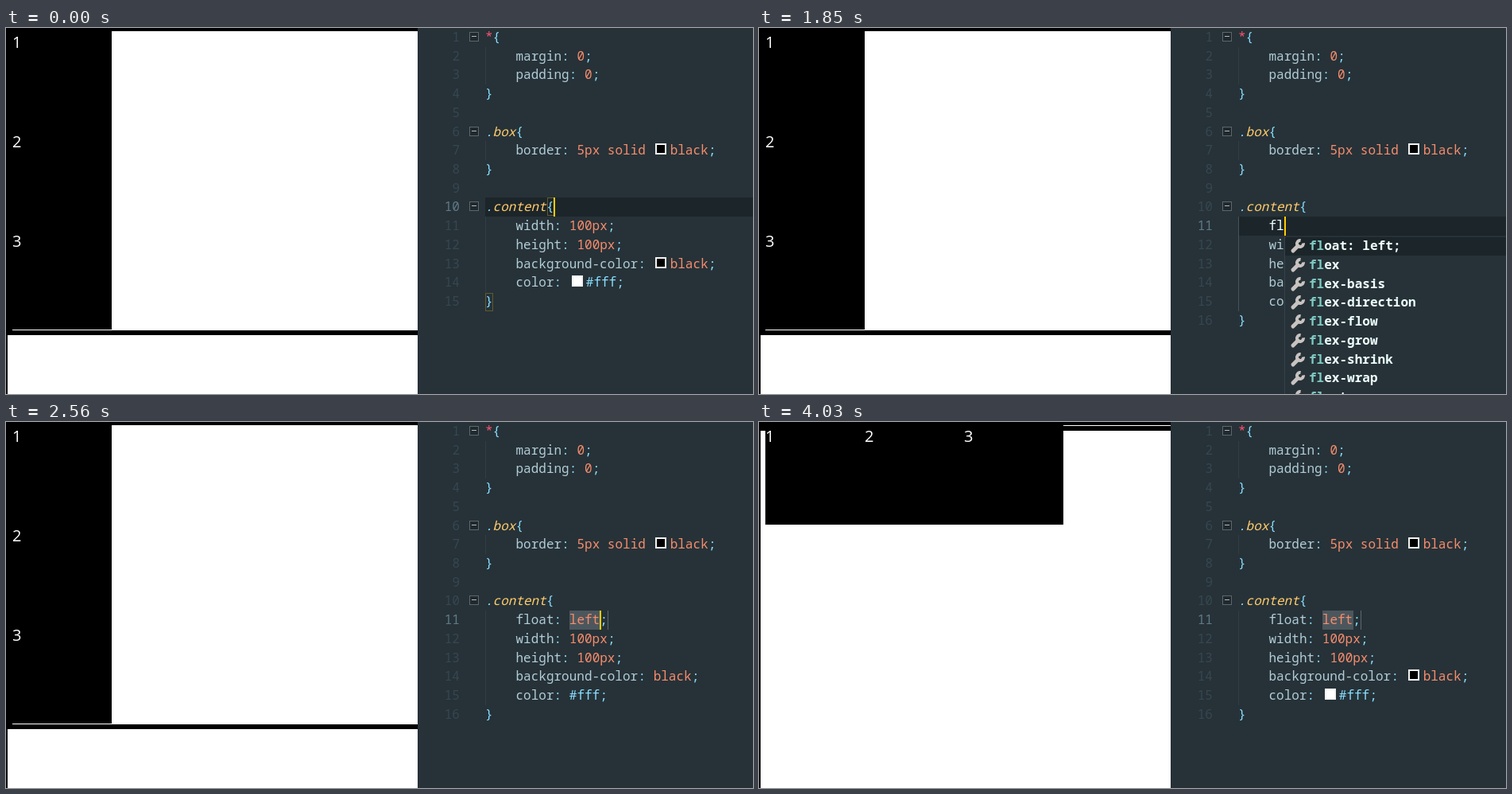
Animation, 940 px wide and 460 px high, one loop 4.5 s. Source, as an HTML page with a canvas:

```html
<!DOCTYPE html>
<html lang="en">
<head>
<meta charset="utf-8">
<title>Floating boxes</title>
<style>
html, body { margin: 0; width: 100%; height: 100%; overflow: hidden; background: #263238; }
canvas { display: block; }
</style>
</head>
<body>
<canvas id="stage" width="940" height="460"></canvas>
<script>
const g = document.getElementById('stage').getContext('2d');
const LOOP = 4500, PITCH = 23.72, ADV = 9.62, LEFT = 603;
const MONO = '16px "Noto Sans Mono", "DejaVu Sans Mono", monospace';
const C = {
  bg: '#263238', dark: '#1c2529', dim: '#37474f', active: '#607a86', guide: '#313e44',
  punct: '#89ddff', prop: '#b2ccd6', value: '#f78c6c', name: '#ffcb6b', star: '#ff5370',
  plain: '#eeffff', match: '#80cbc4', caret: '#ffcc00'
};

const POPUPS = {
  f: ['float: left;', 'font', 'font-family', 'font-feature-settings', 'font-kerning',
    'font-size', 'font-size-adjust', 'font-stretch', 'font-style'],
  fl: ['float: left;', 'flex', 'flex-basis', 'flex-direction', 'flex-flow',
    'flex-grow', 'flex-shrink', 'flex-wrap', 'float'],
  flo: ['float: left;', 'float', 'flood-color', 'flood-opacity', 'flex-flow',
    'fill-opacity', 'flex-direction', '-webkit-flex-direction', '-ms-flex-flow'],
  flol: ['float: left;', 'flood-color', 'flex-flow', 'fill-opacity', '-ms-flex-flow',
    '-webkit-text-fill-color', 'animation-fill-mode', '-o-animation-fill-mode',
    '-webkit-animation-fill-mode']
};

const lineTop = n => Math.round(PITCH * (n - 1));
const lineHeight = n => lineTop(n + 1) - lineTop(n);
const col = n => LEFT + n * ADV;
const caretX = n => Math.floor(col(n) + 0.3);

function rect(color, x, y, w, h) {
  g.fillStyle = color;
  g.fillRect(x, y, w, h);
}

function outline(color, x, y, w, h) {
  g.strokeStyle = color;
  g.lineWidth = 1;
  g.strokeRect(x + 0.5, y + 0.5, w - 1, h - 1);
}

function text(s, x, y, color, style = 'normal') {
  g.font = style + ' ' + MONO;
  g.fillStyle = color;
  g.fillText(s, x, y);
}

const code = (s, c, n, color, style) => text(s, col(c), lineTop(n) + 17, color, style);

function fold(n) {
  const y = lineTop(n) + 5;
  rect('#20292e', 583, y, 12, 12);
  outline('#5c676c', 583, y, 12, 12);
  rect('#b4babd', 586, y + 5, 6, 1);
}

function selector(n, name) {
  if (name === '*') code('*', 0, n, C.star);
  else {
    code('.', 0, n, C.punct, 'italic');
    code(name.slice(1), 1, n, C.name, 'italic');
  }
  code('{', name.length, n, C.punct);
}

// A colour chip, when given, sits between lead and value.
function declare(n, prop, value, chip, lead = '') {
  let c = 4 + prop.length + 2;
  code(prop, 4, n, C.prop);
  code(':', c - 2, n, C.punct);
  code(lead, c, n, C.value);
  c += lead.length;
  if (chip) {
    const x = Math.round(col(c) + 2.8), y = lineTop(n) + 3;
    rect('#f2f2f2', x, y, 14, 14);
    rect(chip, x + 2, y + 2, 10, 10);
    c += 21 / ADV;
  }
  code(value, c, n, value[0] === '#' ? C.punct : C.value);
  code(';', c + value.length, n, C.punct);
}

function guide(from, to, color = C.guide) {
  rect(color, 603, lineTop(from), 1, lineTop(to + 1) - lineTop(from));
}

// Indexes of the letters of key within s, or null.
function matches(s, key) {
  const hits = [];
  let at = -1;
  for (const ch of key) {
    at = s.indexOf(ch, at + 1);
    if (at < 0) return null;
    hits.push(at);
  }
  return hits;
}

function wrench(x, y) {
  g.strokeStyle = '#c8c3c0';
  g.lineCap = 'round';
  g.lineWidth = 5;
  g.beginPath();
  g.moveTo(x + 3, y + 15);
  g.lineTo(x + 9, y + 9);
  g.stroke();
  g.lineCap = 'butt';
  g.lineWidth = 4;
  g.beginPath();
  g.arc(x + 12, y + 6, 4, -0.15, Math.PI * 1.5 + 0.15);
  g.stroke();
}

function drawPopup(key) {
  const x = caretX(4 + key.length), y = lineTop(12);
  rect(C.bg, x, y, 940 - x, 460 - y);
  rect('#364249', x, y, 1, 460 - y);
  rect(C.dark, x + 1, y + 2, 939 - x, 23);
  POPUPS[key].forEach((item, i) => {
    const base = Math.round(279 + 23.75 * i);
    const hits = matches(item, key) || matches(item, 'fllo') || [];
    wrench(x + 8, base - 14);
    [...item].forEach((ch, j) =>
      text(ch, x + 31 + j * ADV, base, hits.includes(j) ? C.match : C.plain, 'bold'));
  });
}

function preview(floated) {
  rect('#000', 0, 0, 518, 460);
  if (floated) {
    rect('#fff', 2, 11, 516, 449);
    rect('#fff', 383, 4, 135, 1);
    rect('#000', 8, 0, 375, 129);
  } else {
    rect('#fff', 133, 4, 385, 375);
    rect('#fff', 8, 379, 510, 1);
    rect('#fff', 2, 386, 516, 74);
  }
  g.font = '20px "Open Sans", "Noto Sans", sans-serif';
  g.fillStyle = '#fff';
  for (let i = 0; i < 3; i++)
    g.fillText(i + 1, 8 + (floated ? 125 * i : 0), 25 + (floated ? 0 : 125 * i));
}

function draw(t) {
  const opened = t >= 1140, done = t >= 2560;
  const shift = opened ? 1 : 0, current = 10 + shift, last = 15 + shift;
  const typed = t < 1620 || done ? ''
    : t < 1850 ? 'f' : t < 2090 ? 'fl' : t < 2320 ? 'flo' : 'flol';
  const list = t < 1680 ? '' : t >= 2320 && t < 2390 ? 'flo' : typed;
  const caretOn = !(t >= 440 && t < 900 || t >= 3090 && t < 3570 || t >= 4030);

  preview(t >= 3630);
  rect(C.bg, 518, 0, 422, 460);
  if (!done) rect(C.dark, LEFT, lineTop(current), 940 - LEFT, lineHeight(current));
  guide(2, 3);
  guide(7, 7);
  guide(11, last - 1, opened && !done ? '#46545b' : C.guide);

  for (let n = 1; n <= last; n++)
    text(n, 571 - String(n).length * ADV, lineTop(n) + 17, n === current ? C.active : C.dim);
  [1, 6, t >= 1140 && t < 1370 ? 11 : 10].forEach(fold);

  selector(1, '*');
  declare(2, 'margin', '0');
  declare(3, 'padding', '0');
  code('}', 0, 4, C.punct);
  selector(6, '.box');
  declare(7, 'border', 'black', '#000', '5px solid ');
  code('}', 0, 8, C.punct);
  selector(10, '.content');

  if (done) {
    rect('#4c575d', 709, lineTop(11), 39, lineHeight(11));
    declare(11, 'float', 'left');
    rect('#5d686d', 757, lineTop(11), 1, lineHeight(11));
  } else code(typed, 4, 11, C.plain);

  const chips = !done || t >= 3320;
  declare(11 + shift, 'width', '100px');
  declare(12 + shift, 'height', '100px');
  declare(13 + shift, 'background-color', 'black', chips && '#000');
  declare(14 + shift, 'color', '#fff', chips && '#fff');
  code('}', 0, last, C.punct);

  if (!opened) {
    outline('#62592f', 681, lineTop(10), 10, 23);
    outline('#62592f', 603, lineTop(15) + 1, 10, 23);
  }
  if (list) drawPopup(list);
  const c = !opened ? 9 : done ? 15 : 4 + typed.length;
  if (caretOn) rect(C.caret, caretX(c), lineTop(current), 2, lineHeight(current));
}

function tick() {
  draw(performance.now() % LOOP);
  requestAnimationFrame(tick);
}
tick();
</script>
</body>
</html>
```
